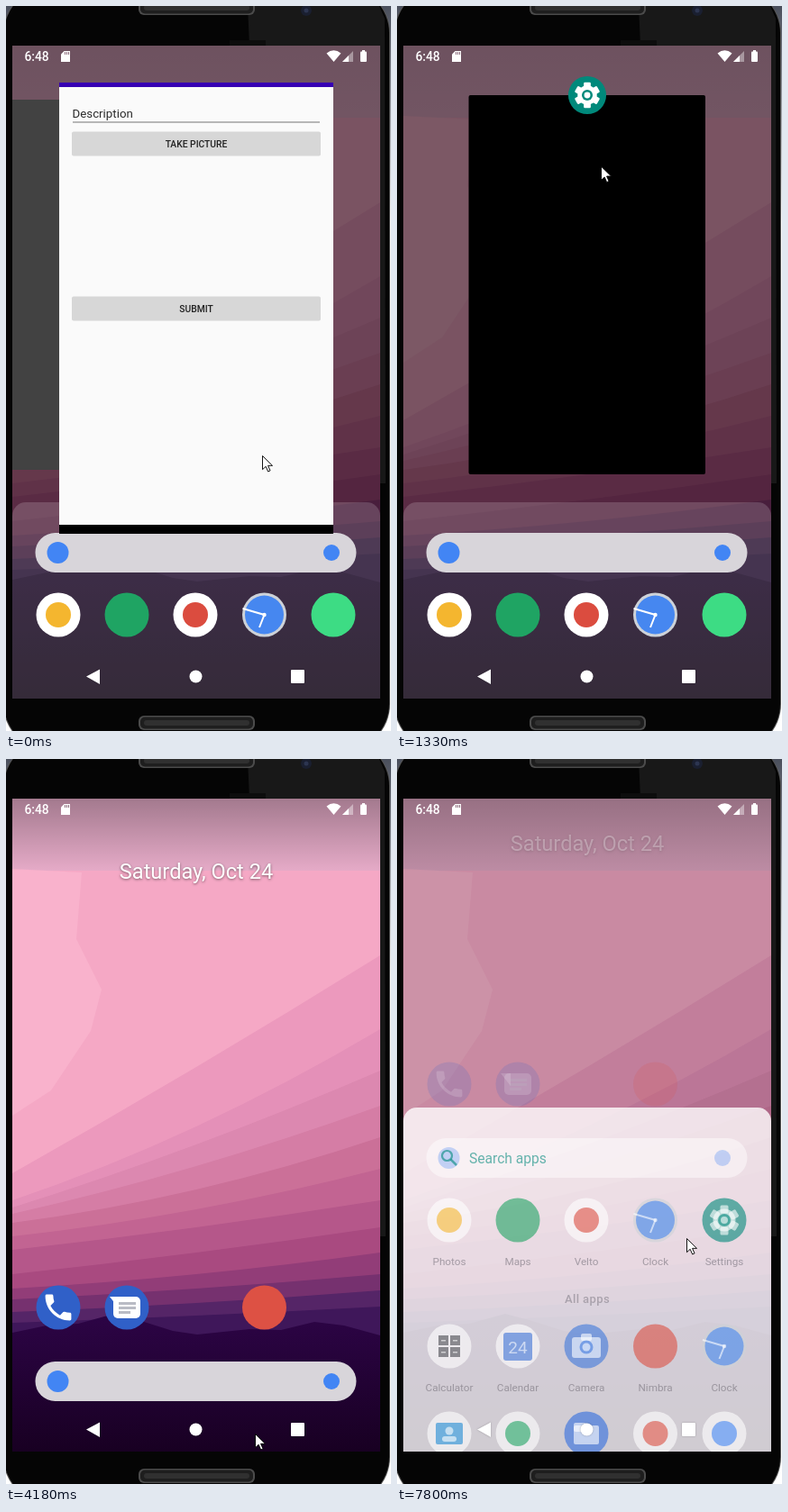
An HTML page with a canvas that plays this animation: 427x805 px, repeating every 8 s.

```html
<!DOCTYPE html>
<html lang="en">
<head>
<meta charset="utf-8">
<title>Phone launcher</title>
<style>
html, body { margin: 0; width: 100%; height: 100%; overflow: hidden; background: #fff; }
canvas { display: block; width: 427px; height: 805px; }
</style>
</head>
<body>
<canvas id="stage" width="427" height="805"></canvas>
<script>
const ctx = document.getElementById('stage').getContext('2d');
const LOOP = 8000, COLUMNS = [58, 134, 210, 286.5, 363];
const BLUE = '#4285f4', TEAL = '#00897b', ROYAL = '#3060c8';

const BURSTS = [[140, 500, 4], [770, 1590, 7], [1870, 2010, 2], [2320, 2710, 4], [2980, 3910, 8],
  [4030, 4180, 2], [4460, 5280, 6], [5570, 6230, 6], [6620, 7650, 8], [7800, 7800, 1]];

function snap(t) {
  let shown = 0;
  for (const [from, to, steps] of BURSTS) {
    if (t < from) break;
    const gap = (to - from) / (steps - 1) || 1;
    shown = Math.min(to, from + Math.floor((t - from + 15) / gap) * gap);
  }
  return shown;
}

// Linear interpolation through [time, value] points.
function track(t, ...points) {
  const i = points.findIndex(p => p[0] > t);
  if (i === 0) return points[0][1];
  if (i < 0) return points[points.length - 1][1];
  const [t0, v0] = points[i - 1], [t1, v1] = points[i];
  return v0 + (v1 - v0) * (t - t0) / (t1 - t0);
}

const mix = (a, b, k) => a + (b - a) * k;
const easeOut = (t, from, to) => 1 - (1 - Math.min(1, Math.max(0, (t - from) / (to - from)))) ** 3;

function rect(x, y, w, h, color, r = 0) {
  ctx.fillStyle = color;
  ctx.beginPath();
  ctx.roundRect(x, y, w, h, r);
  ctx.fill();
}

function disc(x, y, r, color) {
  ctx.fillStyle = color;
  ctx.beginPath();
  ctx.arc(x, y, r, 0, 7);
  ctx.fill();
}

function shape(color, ...points) {
  ctx.fillStyle = color;
  ctx.beginPath();
  points.forEach(p => ctx.lineTo(...p));
  ctx.fill();
}

function line(color, width, ...points) {
  ctx.strokeStyle = color;
  ctx.lineWidth = width;
  ctx.beginPath();
  points.forEach(p => ctx.lineTo(...p));
  ctx.stroke();
}

function text(str, x, y, size, color, align = 'center', weight = 400, spacing = 0) {
  ctx.font = `${weight} ${size}px Roboto, sans-serif`;
  ctx.letterSpacing = spacing + 'px';
  ctx.textAlign = align;
  ctx.fillStyle = color;
  ctx.fillText(str, x, y);
}

// Draw in a saved state, moved, scaled and faded.
function group(x, y, scale, alpha, draw) {
  if (alpha <= 0) return;
  ctx.save();
  ctx.translate(x, y);
  ctx.scale(scale, scale);
  ctx.globalAlpha *= alpha;
  draw();
  ctx.restore();
}

const HANDSET = new Path2D('M6.6 10.8c1.4 2.8 3.8 5.1 6.6 6.6l2.2-2.2c.3-.3.7-.4 1-.2 1.1.4 2.3.6 3.6.6.6 0 1 .4 1 1V20c0 .6-.4 1-1 1C10.600 21 3 13.400 3 4c0-.6.4-1 1-1h3.500c.6 0 1 .4 1 1 0 1.300.2 2.500.6 3.600.1.3 0 .7-.3 1z');
const POINTER = new Path2D('M0 0V16.500L4 12.800L6.700 19L9.300 17.800L6.600 11.800H12Z');

const tile = color => disc(0, 0, 24.5, color);
const badge = color => () => { tile('#fff'); disc(0, 0, 14, color); };
const plain = color => () => tile(color);

const ICONS = {
  photos: badge('#f4b62f'),
  maps: plain('#1fa463'),
  mail: badge('#db4c3f'),
  drive: badge('#1fa463'),
  web: badge(BLUE),
  browser: plain('#dd5144'),
  app: plain('#3ddc84'),
  clock() {
    tile('#cdd2d8');
    disc(0, 0, 21.5, '#4687f0');
    line('#fff', 2, [-24, -7], [0, 0], [-5.5, 14]);
    disc(0, 0, 2.2, '#fff');
  },
  gear() {
    tile(TEAL);
    for (let i = 0; i < 6; i++) {
      rect(-4.5, -16.5, 9, 9, '#fff', 1.5);
      ctx.rotate(Math.PI / 3);
    }
    disc(0, 0, 12.5, '#fff');
    disc(0, 0, 7, TEAL);
    disc(0, 0, 4, '#fff');
  },
  phone() {
    tile(ROYAL);
    ctx.scale(1.6, 1.6);
    ctx.translate(-12, -12);
    ctx.fillStyle = '#fff';
    ctx.fill(HANDSET);
  },
  chat() {
    tile(ROYAL);
    shape('#fff', [-19, -12], [-8, -12], [-8, 2]);
    rect(-15, -12, 30, 24, '#fff', 5);
    [[-6, 19], [-1, 19], [4, 13]].forEach(([y, w]) => rect(-9, y, w, 3, '#b9bbc4'));
  },
  calculator() {
    tile('#fff');
    for (const x of [-12, 1]) for (const y of [-12, 1]) {
      rect(x, y, 11, 11, '#49494f');
      rect(x + 3, y + 5, 5, 1.5, '#fff');
    }
  },
  calendar() {
    tile('#fff');
    rect(-16, -15, 32, 31, '#3b6fd6', 3);
    text('24', 0, 8, 19, '#fff');
  },
  camera() {
    tile('#3f78dd');
    rect(-6, -14, 12, 8, '#fff', 2);
    rect(-16, -10, 32, 23, '#fff', 3);
    disc(0, 1, 7.5, '#3f78dd');
    disc(0, 1, 4.5, '#fff');
  },
  contacts() {
    tile('#fff');
    rect(-15, -12, 30, 24, '#1e88d2', 2);
    disc(0, -3, 4.5, '#fff');
    rect(-8, 3, 16, 6, '#fff', 3);
  },
  files() {
    tile('#2f6de0');
    rect(-14, -12, 14, 10, '#fff', 2);
    rect(-14, -9, 28, 21, '#fff', 2);
  }
};

const icon = (name, x, y, scale = 1, alpha = 1) => group(x, y, scale, alpha, ICONS[name]);

function drawBody() {
  const edge = ctx.createLinearGradient(0, 0, 0, 805);
  edge.addColorStop(0, '#4a4f5c');
  edge.addColorStop(.3, '#fff');
  rect(0, 0, 427, 805, edge);
  rect(-3, -22, 429, 849, '#555', 52);
  rect(-2, -21, 427, 847, '#050505', 51);
  shape('#181818', [268, 0], [414, 0], [420, 14], [421, 530], [415, 530], [415, 44], [270, 44]);
  rect(248, 38, 40, 6, '#0d0d0d');
  disc(333, 5, 6, '#1a1f30');
  disc(333, 5, 2.5, '#2c3550');
  for (const y of [-6, 788]) {
    rect(147, y, 129, 16, '#4b4b4b', 6);
    rect(149, y + 1.5, 125, 13, '#1e1e1e', 5);
    rect(153, y + 5, 117, 6, '#303030', 3);
  }
}

// Sky layers: edge height at left, centre and right, then colour.
const LAYERS = [
  [460, 342, 218, '#ec99bd'], [490, 408, 300, '#e490b8'], [498, 428, 346, '#dc88b0'],
  [505, 452, 385, '#d57da5'], [515, 478, 420, '#cb7098'], [530, 500, 455, '#c26492'],
  [545, 520, 490, '#b5578a'], [572, 548, 520, '#a94a80'], [588, 572, 548, '#923d78'],
  [600, 588, 572, '#76316f'], [614, 604, 590, '#552567'], [626, 618, 608, '#3f175a']
];

function drawWallpaper(dim) {
  rect(7, 44, 408, 725, '#f5a8c5');
  rect(7, 44, 408, 80, '#e6abc8');
  shape('#f9b2cc', [7, 122], [84, 126], [78, 200], [106, 256], [94, 302], [50, 368], [7, 396]);
  for (const [left, middle, right, color] of LAYERS) {
    ctx.fillStyle = color;
    ctx.beginPath();
    ctx.moveTo(7, left);
    ctx.quadraticCurveTo(211, 2 * middle - (left + right) / 2, 415, right);
    ctx.lineTo(415, 769);
    ctx.lineTo(7, 769);
    ctx.fill();
  }
  const hills = ctx.createLinearGradient(0, 620, 0, 769);
  hills.addColorStop(0, '#2c0445');
  hills.addColorStop(1, '#180022');
  shape(hills, [7, 637], [45, 629], [80, 627], [120, 616], [150, 624], [185, 635], [212, 639],
    [270, 633], [305, 634], [342, 625], [375, 629], [415, 640], [415, 769], [7, 769]);
  rect(7, 44, 408, 725, `rgba(0,0,0,${dim})`);
  const shade = ctx.createLinearGradient(0, 44, 0, 125);
  shade.addColorStop(0, `rgba(0,0,0,${.29 - dim * .5})`);
  shade.addColorStop(1, 'rgba(0,0,0,0)');
  rect(7, 44, 408, 81, shade);
}

function drawAppCard(t) {
  const k = easeOut(t, 0, 500);
  const lift = track(t, [500, 0], [770, -150], [907, -425], [1040, -520]);
  const alpha = track(t, [700, 1], [907, .27], [1030, 0]);
  const height = mix(501, 421, k);
  group(mix(59, 80, k), mix(85, 99, k) + lift, mix(304, 262, k) / 304, alpha, () => {
    const bottom = height * 304 / mix(304, 262, k);
    rect(0, 0, 304, bottom, '#fafafa', 2 * k);
    rect(0, 0, 304, 5, '#3700b3');
    rect(0, bottom - 10, 304, 10, '#000');
    text('Description', 14.500, 38.500, 13.300, '#2b2b2b', 'left');
    rect(15, 43.500, 274, 1, '#777');
    for (const [label, y] of [['TAKE PICTURE', 54.500], ['SUBMIT', 237.500]]) {
      rect(14, y, 276, 27, '#d7d7d7', 2);
      text(label, 152, y + 17.500, 10.300, '#222', 'center', 500);
    }
  });
  icon('app', 211, 99 + lift, .86, Math.min(alpha, track(t, [250, 0], [500, 1])));
}

function drawSettingsCard(t) {
  const x = track(t, [640, -277], [770, -190], [907, -24], [1040, 0]);
  const lift = track(t, [2580, 0], [2710, -250], [2980, -480]);
  const alpha = track(t, [2580, 1], [2710, .6], [2980, 0]);
  const inset = t < 250 ? 5 : 0;
  group(x, lift, 1, alpha, () => {
    rect(79.500, 99 + inset, 262.500, 421 - 2 * inset, inset ? '#424242' : '#000', 2);
    icon('gear', 211, 99, .86);
  });
}

function drawDrawer(t, y) {
  const open = track(t, [7000, 0], [7650, 1]);
  const sheet = track(t, [2980, .17], [3380, 0], [6880, 0], [7650, .8]);
  const dock = track(t, [2980, 1], [3380, .6], [3780, 0], [6880, 0], [7650, .6]);
  const hotseat = track(t, [2980, 0], [3380, .5], [3780, 1], [6880, 1], [7650, .17]);
  const date = track(t, [2980, 0], [3380, .6], [3780, 1], [6880, 1], [7650, .3]);

  group(0, 0, 1, date, () => {
    ctx.shadowColor = 'rgba(0,0,0,.5)';
    ctx.shadowBlur = 3;
    ctx.shadowOffsetY = 1;
    text('Saturday, Oct 24', 211, 133 + (y - 691) / 8, 23.600, '#fff');
  });
  ['phone', 'chat', '', 'browser'].forEach((name, i) => name && icon(name, COLUMNS[i], y - 82, 1, hotseat));

  rect(7, y - 56, 408, 830, `rgba(255,255,255,${sheet})`, 15);
  group(0, 0, 1, 1 - open, () => rect(32.500, y - 22, 356, 44, t > 4460 ? '#cecbd2' : '#d8d5da', 22));
  group(0, 0, 1, open * .45, () => rect(32.500, y - 22, 356, 44, '#fff', 22));
  group(0, y, 1, 1 - open * .7, () => {
    disc(57.500, 0, 12, BLUE);
    disc(361, 0, 9, BLUE);
  });

  group(0, y, 1, open * .6, () => {
    ctx.strokeStyle = TEAL;
    ctx.lineWidth = 2.200;
    ctx.beginPath();
    ctx.arc(55.500, -2.500, 5.500, 0, 7);
    ctx.stroke();
    line(TEAL, 2.500, [59.500, 1.500], [66, 8]);
    text('Search apps', 80, 6, 15.600, TEAL, 'left');
  });

  const fifth = t < 4500 ? 'app' : 'gear';
  ['photos', 'maps', 'mail', 'clock', fifth].forEach((name, i) => icon(name, COLUMNS[i], y + 69, 1, dock));
  if (!open) return;
  group(0, y, 1, open * .6, () => {
    ['calculator', 'calendar', 'camera', 'browser', 'clock'].forEach((name, i) => icon(name, COLUMNS[i], 209));
    ['contacts', 'drive', 'files', 'mail', 'web'].forEach((name, i) => icon(name, COLUMNS[i], 306));
    ['Photos', 'Maps', 'Velto', 'Clock', 'Settings'].forEach((s, i) => text(s, COLUMNS[i], 118.500, 11.700, '#75707a'));
    ['Calculator', 'Calendar', 'Camera', 'Nimbra', 'Clock'].forEach((s, i) => text(s, COLUMNS[i], 258.500, 11.700, '#75707a'));
    text('All apps', 211, 161, 13, '#85808a', 'center', 500, .4);
  });
}

function drawSystemBars() {
  text('6:48', 20.500, 61, 13.800, '#fff', 'left', 500);
  shape('#fff', [64.500, 50], [71, 50], [71, 62], [61, 62], [61, 53.500]);
  for (const x of [65, 67, 69]) rect(x, 51, 1, 3, '#8a6a7a');
  ctx.fillStyle = '#fff';
  ctx.beginPath();
  ctx.moveTo(363.500, 62);
  ctx.lineTo(355.500, 52.500);
  ctx.quadraticCurveTo(363.500, 46, 371.500, 52.500);
  ctx.fill();
  shape('rgba(255,255,255,.4)', [385, 50], [385, 62], [373, 62]);
  shape('#fff', [380, 55], [380, 62], [373, 62]);
  rect(393, 50.500, 7, 11.500, '#fff', 1);
  rect(395, 49, 3, 2, '#fff');
  group(0, 0, 1, 1, () => {
    ctx.shadowColor = 'rgba(0,0,0,.3)';
    ctx.shadowBlur = 2;
    shape('#fff', [89, 744.500], [104, 736.500], [104, 753]);
    disc(210.500, 744.500, 7, '#fff');
    rect(316, 737, 15, 15, '#fff', 1);
  });
}

const PATH = [[0, 284, 499], [380, 284, 499], [500, 240, 440], [770, 230, 200], [1180, 225, 40], [1590, 228, 453],
  [1870, 233, 460], [2010, 239, 468], [2320, 237, 380], [2450, 220, 150], [2580, 205, 29], [2980, 205, 30],
  [3110, 250, 260], [3379, 339, 663], [3910, 276, 734], [4180, 276, 749], [4460, 258, 600], [4720, 240, 33],
  [5000, 235, 300], [5280, 232, 700], [5570, 240, 749], [5834, 225, 678], [6098, 213, 33], [6230, 240, 150],
  [6620, 250, 500], [6900, 270, 784], [7200, 278, 784], [7650, 278, 697], [7800, 321, 532]];

function drawPointer(t) {
  if (t > 800 && t < 1000) return;
  const x = track(t, ...PATH.map(p => [p[0], p[1]]));
  const y = track(t, ...PATH.map(p => [p[0], p[2]]));
  group(x + .5, y + .5, .92, 1, () => {
    ctx.fillStyle = '#fff';
    ctx.fill(POINTER);
    ctx.strokeStyle = '#000';
    ctx.lineWidth = 1;
    ctx.stroke(POINTER);
  });
}

function frame(now) {
  const t = snap(now % LOOP);
  const dim = track(t, [2980, .5], [3380, .18], [3700, 0], [6880, 0], [7650, .18]);
  const searchY = mix(607, 691, easeOut(t, 2980, 3650)) - 248 * easeOut(t, 6880, 7650);
  drawBody();
  ctx.save();
  ctx.beginPath();
  ctx.rect(7, 44, 408, 725);
  ctx.clip();
  drawWallpaper(dim);
  drawDrawer(t, searchY);
  if (t < 2980) drawSettingsCard(t);
  if (t < 1040) drawAppCard(t);
  drawSystemBars();
  ctx.restore();
  drawPointer(t);
  requestAnimationFrame(frame);
}
requestAnimationFrame(frame);
</script>
</body>
</html>
```
